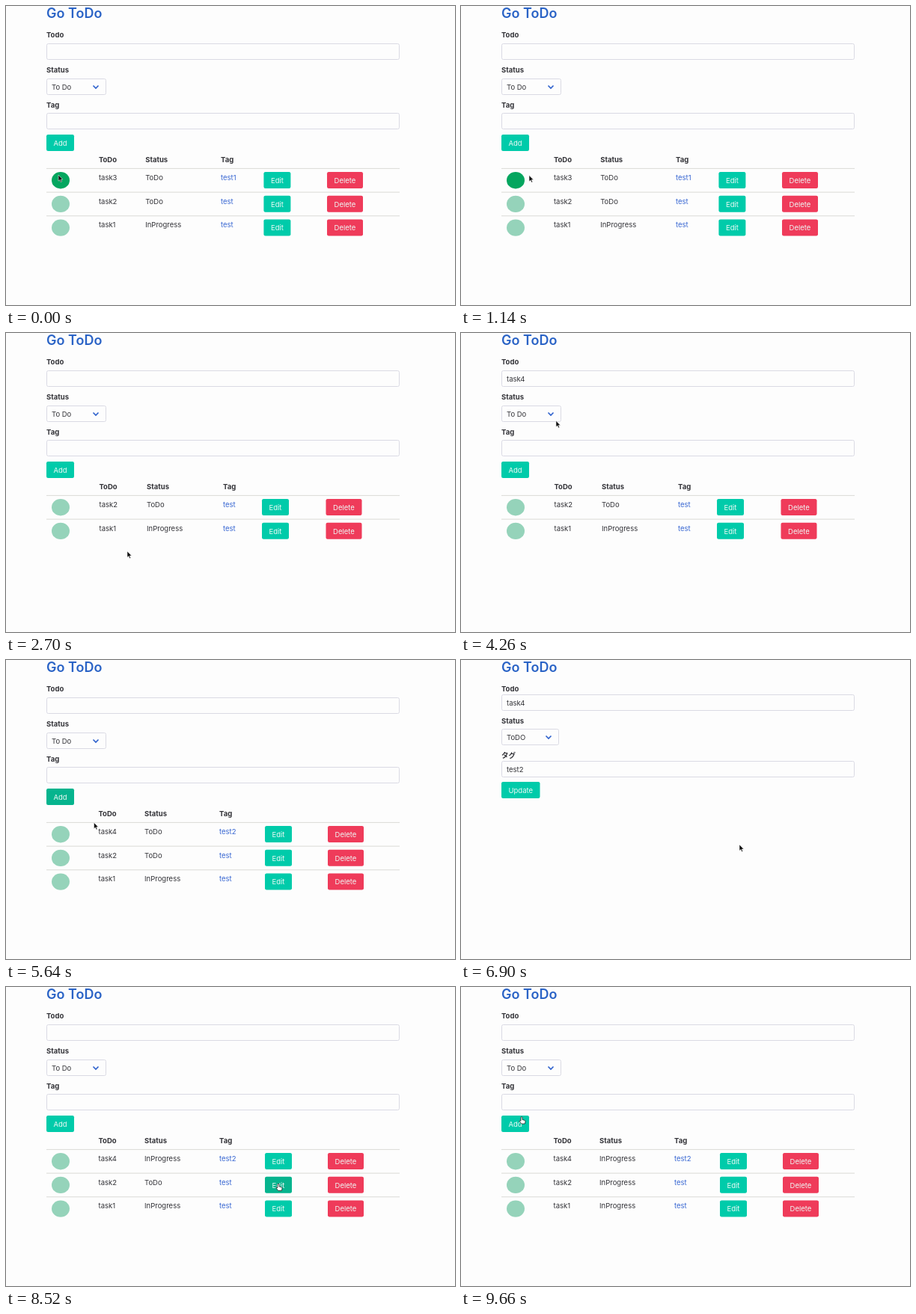
An HTML page for the animation above (9720 ms loop, 600x400 px).

```html
<!DOCTYPE html>
<html lang="en">
<head>
<meta charset="utf-8">
<title>Go ToDo</title>
<style>
  html, body { margin: 0; height: 100%; overflow: hidden; background: #fdfdfd; }
  svg { display: block; width: 600px; height: 400px; }
  text { font: 9.5px Inter, "Noto Sans CJK JP", sans-serif; fill: #333338; }
  .bold { font-weight: 700; }
  .title { font-size: 18px; font-weight: 600; fill: #2a63c6; }
  .link { fill: #3766d2; }
  .label { fill: #eef9f6; text-anchor: middle; }
  .field { fill: none; stroke: #dadae4; }
  .rule { stroke: #dadad6; }
  .chevron { fill: none; stroke: #2d60cc; stroke-width: 1.6; }
</style>
</head>
<body>
<svg id="stage" viewBox="0 0 600 400"></svg>
<script>
const LOOP = 9720, STEP = 60, MOVE = 420, HOVER_LAG = 180;
const GREEN = ['#00cbaa', '#06b48e'], RED = ['#ef3b5a', '#e6244a'];

// Pointer stops: arrival time, x, y
const stops = [
  [0, 70, 226], [1500, 449, 237], [2700, 162, 292], [3120, 130, 61],
  [4440, 125, 154], [5400, 75, 182], [5640, 117.5, 217.5], [5940, 240, 350],
  [6420, 363, 233], [6900, 372, 247], [7320, 100, 103], [7860, 80, 174],
  [8340, 364, 263], [8940, 100, 103], [9420, 81, 173.5], [LOOP, 81, 173.5]
];

const cursors = {
  arrow: '<path d="M0 0V8.2L1.9 6.5 3.2 9.5 4.6 8.9 3.3 6H5.9z" fill="#111" stroke="#fff" stroke-width=".5"/>',
  hand: '<path d="M-1 .8Q0-.6 1 .8V4l3 .8q1.2.4 1 2L4.3 9.5H-.2L-3 6q0-1.4 2-.4z" fill="#fff" stroke="#222" stroke-width=".8"/>',
  beam: '<path d="M-1.5-4.5H1.5M0-4.5V4.5M-1.5 4.5H1.5" stroke="#222" stroke-width=".8"/>'
};

const task = (n, status, tag) => ({ n, cells: ['task' + n, status, tag] });

// Pages in order: start time, then a table or an edit form
const pages = [
  { start: 0, spread: 1, rows: [task(3, 'ToDo', 'test1'), task(2, 'ToDo', 'test'), task(1, 'InProgress', 'test')] },
  { start: 2280, spread: 2.5, rows: [task(2, 'ToDo', 'test'), task(1, 'InProgress', 'test')] },
  { start: 5400, spread: 0, rows: [task(4, 'ToDo', 'test2'), task(2, 'ToDo', 'test'), task(1, 'InProgress', 'test')] },
  { start: 6600, edit: task(4, 'ToDO', 'test2') },
  { start: 7980, spread: 0, rows: [task(4, 'InProgress', 'test2'), task(2, 'ToDo', 'test'), task(1, 'InProgress', 'test')] },
  { start: 8580, edit: task(2, 'ToDO', 'test') },
  { start: 9600, spread: 0, rows: [task(4, 'InProgress', 'test2'), task(2, 'InProgress', 'test'), task(1, 'InProgress', 'test')] }
];

let mouse, hover, cursor;

function pointerAt(t) {
  const i = stops.findIndex(s => s[0] > t);
  const [t0, x0, y0] = stops[i - 1], [t1, x1, y1] = stops[i];
  const u = Math.max(0, 1 - (t1 - t) / Math.min(MOVE, t1 - t0));
  const k = u * u * (3 - 2 * u);
  return [x0 + (x1 - x0) * k, y0 + (y1 - y0) * k];
}

const inside = (p, x, y, w, h = 22) => p && p[0] >= x && p[0] <= x + w && p[1] >= y && p[1] <= y + h;

const text = (x, y, s, cls = '') => `<text x="${x}" y="${y}" class="${cls}">${s}</text>`;

const box = (y, s, w) =>
  `<rect x="54.5" y="${y + .5}" width="${w}" height="21" rx="2" class="field"/>` + text(61, y + 14.7, s);

function input(y, s) {
  if (inside(mouse, 54, y, 472)) cursor = 'beam';
  return box(y, s, 471);
}

const select = (y, s, w) => box(y, s, w) + `<path d="M${w + 37.5} ${y + 9.5}l3.5 3.5 3.5-3.5" class="chevron"/>`;

function button(x, y, w, s, colors) {
  if (inside(mouse, x, y, w)) cursor = 'hand';
  const fill = colors[+!!inside(hover, x, y, w)];
  return `<rect x="${x}" y="${y}" width="${w}" height="22" rx="2.2" fill="${fill}"/>` +
    text(x + w / 2, y + 14.8, s, 'label');
}

function table({ rows, spread }) {
  // Columns drift towards the middle as the cells get shorter
  const [name, status, tag, edit, del] =
    [123.5, 185, 285, 346, 430].map((x, i) => x + spread * [.4, 1.2, 2, -1.6, -1][i]);
  const cells = ([a, b, c], y, cls, tagCls) => text(name, y, a, cls) + text(status, y, b, cls) + text(tag, y, c, tagCls);
  return cells(['ToDo', 'Status', 'Tag'], 209.3, 'bold', 'bold') + rows.map((row, i) => {
    const y = 222 + 31.7 * i;
    return `<path d="M54 ${y - 4.6}H526" class="rule"/>` +
      `<ellipse cx="73" cy="${y + 11.2}" rx="12" ry="11.2" fill="${row.n === 3 ? '#04a65f' : '#95d3ba'}"/>` +
      cells(row.cells, y + 10.8, '', 'link') +
      button(edit, y, 36, 'Edit', GREEN) + button(del, y, 48, 'Delete', RED);
  }).join('');
}

function listPage(page, t) {
  const typed = (s, start) => page === pages[1] ? s.slice(0, Math.max(0, (t - start) / 120)) : '';
  return text(54, 42.4, 'Todo', 'bold') + input(50, typed('task4', 3240)) +
    text(54, 89.4, 'Status', 'bold') + select(97, 'To Do', 79) +
    text(54, 135.9, 'Tag', 'bold') + input(143, typed('test2', 4440)) +
    button(54, 172, 37, 'Add', GREEN) + table(page);
}

function editPage({ start, edit }, t) {
  const [name, status, tag] = edit.cells;
  return text(54, 42.4, 'Todo', 'bold') + input(46, name) +
    text(54, 84.9, 'Status', 'bold') + select(92, t - start < 780 ? status : 'InProgress', 76) +
    text(54, 131.2, 'タグ', 'bold') + input(135, tag) +
    button(54, 163, 51.5, 'Update', GREEN);
}

function render(t) {
  const page = pages.findLast(p => p.start <= t);
  mouse = pointerAt(t);
  // A fresh page shows no hover until the pointer has been noticed
  hover = t - page.start >= HOVER_LAG ? pointerAt(t - HOVER_LAG) : null;
  cursor = 'arrow';
  const body = page.edit ? editPage(page, t) : listPage(page, t);
  stage.innerHTML = text(54, 16, 'Go ToDo', 'title') + body +
    `<g transform="translate(${mouse})">${cursors[cursor]}</g>`;
}

const stage = document.getElementById('stage');
let last = -1;
function tick() {
  const t = Math.floor(performance.now() % LOOP / STEP) * STEP;
  if (t !== last) render(last = t);
  requestAnimationFrame(tick);
}
tick();
</script>
</body>
</html>
```
